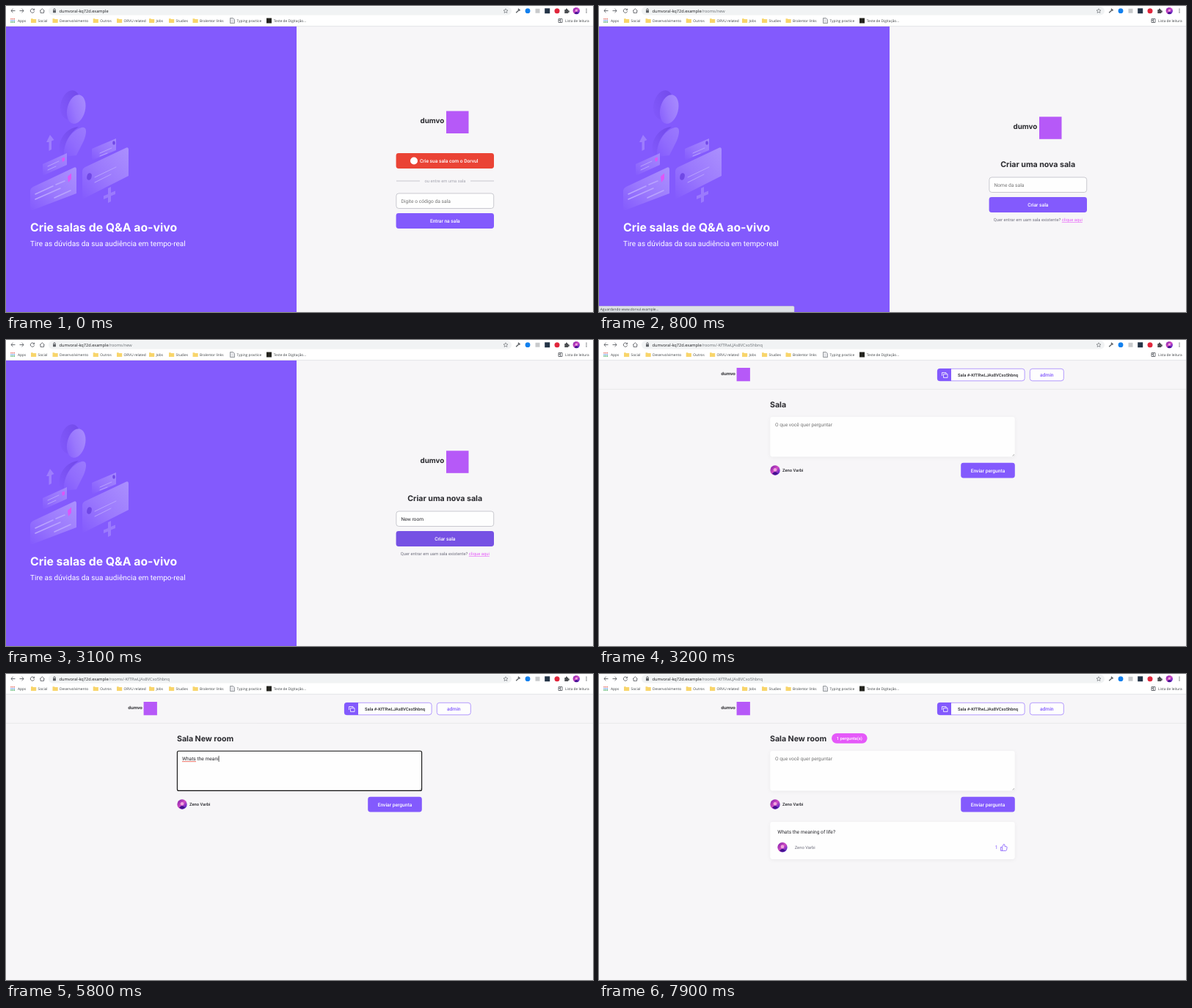
An HTML page for the animation above (8000 ms loop, 800x418 px).

```html
<!DOCTYPE html>
<html lang="pt-BR">
<head>
<meta charset="utf-8">
<title>Sala de perguntas</title>
<style>
  html, body { margin: 0; width: 100%; height: 100%; overflow: hidden; background: #f7f6f8; }
  svg { display: block; width: 100vw; height: 100vh; }
  text { font: 6.67px Roboto, sans-serif; fill: #29292e; white-space: pre; text-rendering: geometricPrecision; }
  .ui text { font: 4.8px "Open Sans", "Noto Sans", sans-serif; fill: #3c4043; }
  .ui .url { font-size: 5.65px; fill: #202124; }
  .ui .path { fill: #6b7075; }
  .ui .icon { fill: none; stroke: #5f6368; stroke-width: .9; }
  .title { font: 700 10.6px Inter, sans-serif; }
  .hero { font: 700 15.8px Inter, sans-serif; fill: #fff; }
  .lead { font-size: 10px; fill: #fff; }
  .brand { font: 700 9.8px Inter, sans-serif; }
  .mid { text-anchor: middle; }
  .bold { font-weight: 500; }
  .small { font-size: 5.83px; }
  .light { fill: #fff; }
  .grey { fill: #737380; }
  .hint { fill: #757575; }
  .field { fill: #fefefe; stroke: #a8a8b3; stroke-width: .6; }
  .panel { fill: #fefefe; filter: drop-shadow(0 1px 2.5px rgba(0,0,0,.05)); }
  .ring { fill: none; stroke: #101010; stroke-width: 1.1; }
  .caret { stroke: #000; stroke-width: .6; }
  .violet { fill: #835afd; }
  .edge { fill: #fefefe; stroke: #835afd; stroke-width: .6; }

  .on { animation: 8s step-end infinite; }
  .home { animation-name: home; }
  .create { animation-name: create; }
  .split { animation-name: split; }
  .room { animation-name: room; }
  .status { animation-name: status; }
  .ring-name { animation-name: ringName; }
  .ring-ask { animation-name: ringAsk; }
  .roomname { animation-name: roomname; }
  .posted { animation-name: posted; }
  .liked { animation-name: liked; }
  .thumb { animation-name: thumb; }
  .hover { animation: 8s linear infinite; }
  .login { animation-name: login; }
  .make { animation-name: make; }
  .send { animation-name: send; }

  @keyframes home { 0% { opacity: 1 } 4.6%, 100% { opacity: 0 } }
  @keyframes create { 0% { opacity: 0 } 4.6% { opacity: 1 } 39.6%, 100% { opacity: 0 } }
  @keyframes split { 0% { opacity: 1 } 39.6%, 100% { opacity: 0 } }
  @keyframes room { 0% { opacity: 0 } 39.6%, 100% { opacity: 1 } }
  @keyframes status { 0% { opacity: 0 } 4.6% { opacity: 1 } 10.9%, 100% { opacity: 0 } }
  @keyframes ringName { 0% { opacity: 0 } 12.2% { opacity: 1 } 35.9%, 100% { opacity: 0 } }
  @keyframes ringAsk { 0% { opacity: 0 } 47.2% { opacity: 1 } 87.2%, 100% { opacity: 0 } }
  @keyframes roomname { 0% { opacity: 0 } 40.9%, 100% { opacity: 1 } }
  @keyframes posted { 0% { opacity: 0 } 88.5%, 100% { opacity: 1 } }
  @keyframes liked { 0% { opacity: 0 } 95.9%, 100% { opacity: 1 } }
  @keyframes thumb { 0% { stroke: #737380 } 95.9%, 100% { stroke: #835afd } }
  @keyframes login { 0%, 1% { fill: #ea4335 } 3.5%, 100% { fill: #d33c30 } }
  @keyframes make { 0%, 32.2% { fill: #835afd } 34.7%, 100% { fill: #7651e4 } }
  @keyframes send { 0%, 84.7% { fill: #835afd } 87.2%, 90% { fill: #7651e4 } 92.5%, 100% { fill: #835afd } }
</style>
</head>
<body>
<svg viewBox="0 0 800 418">
  <defs>
    <linearGradient id="glow" x1="1" y1="0" x2="0" y2="1">
      <stop stop-color="#ab90fe"/><stop offset=".55" stop-color="#9a78fd"/>
      <stop offset="1" stop-color="#835afd"/>
    </linearGradient>
    <linearGradient id="shade" x1="1" y1="0" x2="0" y2="1">
      <stop stop-color="#7149e8"/><stop offset="1" stop-color="#835afd"/>
    </linearGradient>
    <linearGradient id="photo" x2="1" y2="1">
      <stop stop-color="#7a1aa8"/><stop offset=".5" stop-color="#d04cc4"/>
      <stop offset="1" stop-color="#2a14c8"/>
    </linearGradient>
    <path id="folder" d="M0 2.2h2.4l.8.9h4v5H0z" fill="#f8d56b"/>
    <g id="logo">
      <text class="brand" y="16.5">dumvo</text>
      <rect x="35.5" width="30.5" height="30.5" fill="#b659f8"/>
    </g>
    <g id="avatar">
      <circle r="6.7" fill="url(#photo)"/>
      <circle cy="-.8" r="2.3" fill="#f0a5dc"/>
      <path d="M-4 4.6q4-5 8 0q-4 3.6-8 0z" fill="#43128e"/>
    </g>
  </defs>
  <rect width="800" height="418" fill="#f7f6f8"/>

  <!-- Split layout -->
  <g class="on split">
    <rect y="28" width="396" height="390" class="violet"/>
    <ellipse cx="87.5" cy="135" rx="13" ry="20" transform="rotate(14 87.5 135)" fill="url(#shade)"/>
    <ellipse cx="95.7" cy="141" rx="12.2" ry="20.2" transform="rotate(14 95.7 141)" fill="url(#glow)"/>
    <path d="M74 205C68 184 82 166 99 165C86 174 78 188 79 205z" fill="url(#shade)"/>
    <path d="M79 206C78 186 89 170 103 166C111 164 110 174 106 184L96 204z" fill="url(#glow)" opacity=".6"/>
    <path d="M55 186L60 176L65.5 183L62 184.5V196L58.5 198V186z" fill="#9d7dfd"/>
    <path d="M139 249L143 247V255L149 252.5V257L143 259.5V267L139 269V261.5L133 264V259.5L139 257z" fill="#9b7afd"/>
    <g fill="url(#glow)">
      <path d="M50 216L83 201V217L50 232z" opacity=".85"/>
      <path d="M117 195L150 181V197L117 211z" opacity=".85"/>
      <path d="M33 253Q33 249 37 247L92 221Q96 219 96 223V256L33 280z"/>
      <path d="M104 226Q104 222 108 220L163 194Q167 192 167 196V232L104 264z"/>
    </g>
    <g stroke="#b9a3fe" stroke-width="1.6" stroke-linecap="round">
      <path d="M57 219L72 212M57 224L68 219" stroke-width="1"/>
      <path d="M40 257L64 246M68 244L80 239M40 264L74 249M66 262L88 252"/>
      <path d="M121 234L150 220M121 241L143 230M128 201L144 194M128 205L138 201" stroke-width="1"/>
    </g>
    <ellipse cx="113.5" cy="233" rx="3.2" ry="4.8" transform="rotate(14 113.5 233)" fill="#7048e6"/>
    <ellipse cx="147" cy="187" rx="1.8" ry="2.8" fill="#7048e6"/>
    <path d="M76 208L80 206.500V211L77 213z M84 233L89 228.500V236L85 241z" fill="#df55f7"/>
    <text class="hero" x="33" y="308">Crie salas de Q&amp;A ao-vivo</text>
    <text class="lead" x="33" y="328.300">Tire as dúvidas da sua audiência em tempo-real</text>
  </g>

  <!-- Landing form -->
  <g class="on home">
    <use href="#logo" x="564.500" y="143.500"/>
    <rect class="hover login" x="531.600" y="201" width="133.400" height="21" rx="3.400"/>
    <circle cx="556" cy="211.500" r="5" fill="#fff"/>
    <text class="bold light" x="564" y="213.900">Crie sua sala com o Dorvul</text>
    <path d="M532 239H564M633 239H665" stroke="#a8a8b3" stroke-width=".6"/>
    <text class="small mid" x="598.500" y="241" style="fill:#a8a8b3">ou entre em uma sala</text>
    <rect class="field" x="531.900" y="256" width="132.800" height="20.500" rx="3.400"/>
    <text class="hint" x="538.500" y="268.600">Digite o código da sala</text>
    <rect class="violet" x="531.600" y="283" width="133.400" height="21" rx="3.400"/>
    <text class="bold light mid" x="598.300" y="296">Entrar na sala</text>
  </g>

  <!-- New room form -->
  <g class="on create">
    <use href="#logo" x="564.500" y="151.300"/>
    <text class="title mid" x="598.200" y="220">Criar uma nova sala</text>
    <rect class="field" x="531.900" y="234" width="132.800" height="20.500" rx="3.400"/>
    <rect class="ring on ring-name" x="531.900" y="234" width="132.800" height="20.500" rx="3.400"/>
    <text id="name" x="538.500" y="246.600"></text>
    <path id="nameCaret" class="caret" d="M0 240.200V248.600"/>
    <rect class="hover make" x="531.600" y="261" width="133.400" height="21" rx="3.400"/>
    <text class="bold light mid" x="598.300" y="274">Criar sala</text>
    <text class="small grey mid" x="598.300" y="294">Quer entrar em uam sala existente? <tspan fill="#e559f9" text-decoration="underline">clique aqui</tspan></text>
  </g>

  <!-- Room -->
  <g class="on room">
    <path d="M0 67.300H800" stroke="#e2e2e2" stroke-width=".7"/>
    <use href="#logo" transform="translate(166.300 38) scale(.6)"/>
    <rect class="edge" x="461.300" y="39.300" width="118.800" height="16.500" rx="3.400"/>
    <path class="violet" d="M480 39V56H464.500Q461 56 461 52.500V42.500Q461 39 464.500 39z"/>
    <path d="M467.500 49V44.500H473V46M469.500 46.500H475V51.500H469.500z" fill="none" stroke="#fff" stroke-width=".8"/>
    <text class="small bold" x="489" y="49.500">Sala #-KfTRwLJAs8VCxo5hbnq</text>
    <rect class="edge" x="587.300" y="39.300" width="46" height="16.500" rx="3.400"/>
    <text class="bold mid" x="610.300" y="49.900" style="fill:#835afd">admin</text>

    <text class="title" x="233" y="91.600">Sala<tspan class="on roomname" id="suffix"></tspan></text>
    <g class="on posted">
      <rect x="317" y="81" width="48.600" height="13.700" rx="6.850" fill="#e559f9"/>
      <text class="small bold light mid" x="341.300" y="90">1 pergunta(s)</text>
    </g>
    <rect class="panel" x="233.300" y="105" width="333.400" height="54.500" rx="3.400"/>
    <path d="M563.500 158.500L566 156M565 158.500L566 157.500" stroke="#777" stroke-width=".5"/>
    <rect class="ring on ring-ask" x="233.400" y="105.200" width="333.200" height="54.200" rx="2"/>
    <text id="ask" x="240" y="118.200"></text>
    <path id="askCaret" class="caret" d="M0 111.700V120"/>
    <path id="typo" d="M240 119.600H259" stroke="#e5402f" stroke-width=".7"/>
    <use href="#avatar" x="240" y="178"/>
    <text class="small bold" x="250" y="180.200">Zeno Varbi</text>
    <rect class="hover send" x="493.200" y="167.700" width="73.600" height="20.800" rx="3.400"/>
    <text class="bold light mid" x="530" y="180.600">Enviar pergunta</text>

    <g class="on posted">
      <rect class="panel" x="233.300" y="202" width="333.400" height="51" rx="3.400"/>
      <text x="243.300" y="218">Whats the meaning of life?</text>
      <use href="#avatar" x="250" y="236.700"/>
      <text class="small grey" x="266.700" y="238.800">Zeno Varbi</text>
      <text class="on liked" x="539.700" y="239.400" style="fill:#835afd">1</text>
      <path class="on thumb" d="M549.500 236.500L551.500 232.500Q553 232.500 553 234V235.700H555.200Q556.300 235.800 556.100 237L555.500 240.500Q555.300 241.400 554.400 241.400H547.500V236.500H549.500V241.400" fill="none" stroke-width=".8" stroke-linejoin="round"/>
    </g>
  </g>

  <!-- Browser bars -->
  <g class="ui">
    <rect width="800" height="28" fill="#fff"/>
    <path d="M0 27.600H800" stroke="#d9dbdf" stroke-width=".7"/>
    <rect x="58" y="1" width="631" height="11.400" rx="5.700" fill="#f1f3f4"/>
    <g class="icon">
      <path d="M12.500 6.500H7M9.500 3.900L6.800 6.500L9.500 9.100M18.500 6.500H24M21.500 3.900L24.200 6.500L21.500 9.100"/>
      <path d="M38.200 5A2.700 2.700 0 1 0 38.600 7.300M38.700 3.600V5.600H36.600"/>
      <path d="M46 6.800L49.300 3.700L52.600 6.800M47 6.300V9.400H51.600V6.300"/>
      <path d="M64.800 6V4.800A1.200 1.200 0 0 1 67.200 4.800V6"/>
      <path d="M681 3.700L681.900 5.700L684 5.900L682.400 7.300L682.900 9.400L681 8.300L679.100 9.400L679.600 7.300L678 5.900L680.100 5.700z" stroke-width=".6"/>
      <path d="M695.200 9.200L699 5.400" stroke-width="1.400"/>
      <path d="M698 3.800L700.500 6.400" stroke-width="1.800"/>
      <path d="M753 17.500H758V22.500H753zM755.500 17.500V22.500M753 19.500H755.500"/>
      <path d="M791 3.800V9.600" stroke-width="1.300" stroke-dasharray="1.300 .9"/>
    </g>
    <rect x="64" y="5.800" width="4" height="3.400" rx=".4" fill="#5f6368"/>
    <circle cx="711" cy="6.700" r="3.400" fill="#1280ee"/>
    <rect x="721.500" y="3.700" width="6" height="6" fill="#c8cacc"/>
    <rect x="734.200" y="3.200" width="7" height="7" fill="#243447"/>
    <circle cx="751" cy="6.700" r="3.500" fill="#e0263c"/>
    <path d="M761.300 5H763A1.100 1.100 0 1 1 765 5H766.300V6.500A1.100 1.100 0 1 1 766.300 8.500V10H761.300z" fill="#4a4d51"/>
    <use href="#avatar" transform="translate(777.300 6.600) scale(.7)"/>
    <text class="url" x="72.500" y="8.700">dumvoral-kq72d.example<tspan class="path" id="path"></tspan></text>

    <g stroke-width="1.300" stroke-dasharray="1.300 .9">
      <path d="M6.300 17.600H12.500" stroke="#e2574c"/>
      <path d="M6.300 19.800H12.500" stroke="#4688f1"/>
      <path d="M6.300 22H12.500" stroke="#3aa757"/>
    </g>
    <text x="16" y="21.700">Apps</text>
    <g id="marks"></g>
    <path d="M305.500 16.500H309.500L311.500 18.500V23.500H305.500z" fill="#e4e5e8" stroke="#72767c" stroke-width=".7"/>
    <text x="314.500" y="21.700">Typing practice</text>
    <rect x="355" y="16.500" width="7" height="7" fill="#24241f"/>
    <text x="364.700" y="21.700">Teste de Digitação...</text>
    <text x="762" y="21.700">Lista de leitura</text>
    <g class="on status">
      <path d="M0 410H264.500Q266 410 266 411.500V418H0z" fill="#dee1e6" stroke="#c3c6cb" stroke-width=".5"/>
      <text x="1.800" y="416">Aguardando www.dorvul.example...</text>
    </g>
  </g>
</svg>
<script>
  const $ = id => document.getElementById(id);
  const LOOP = 8000, LEAD = 25;
  const ROOM = 'New room', QUESTION = 'Whats the meaning of life?';
  $('suffix').textContent = ' ' + ROOM;

  const folders = [['Social', 34], ['Desenvolvimento', 63.5], ['Outros', 118.7], ['ORVU related', 151],
    ['Jobs', 195], ['Studies', 222], ['Bralentor links', 254.5]];
  $('marks').innerHTML = folders.map(([label, x]) =>
    `<use href="#folder" x="${x}" y="15"/><text x="${x + 9.6}" y="21.7">${label}</text>`).join('');

  // Characters typed at time t, from a few [time, count] points.
  function typed(t, points) {
    let [t0, n0] = points[0];
    for (const [t1, n1] of points) {
      if (t < t1) return Math.floor(n0 + (n1 - n0) * Math.max(0, t - t0) / (t1 - t0 || 1) + .3);
      [t0, n0] = [t1, n1];
    }
    return n0;
  }

  const namePace = [[1430, 0], [1500, 1], [1720, 1], [2300, 8]];
  const askPace = [[4100, 0], [4300, 2], [5800, 15], [6700, 26]];

  function showField(id, text, hint, focused) {
    const el = $(id), caret = $(id + 'Caret');
    el.textContent = text || hint;
    el.setAttribute('class', text ? '' : 'hint');
    const x = +el.getAttribute('x') + (text ? el.getComputedTextLength() : 0) + .3;
    caret.setAttribute('transform', `translate(${x})`);
    caret.style.opacity = focused ? 1 : 0;
  }

  function draw() {
    const t = (performance.now() + LEAD) % LOOP;
    $('path').textContent = t < 400 ? '' : t < 3200 ? '/rooms/new' : '/rooms/-KfTRwLJAs8VCxo5hbnq';
    showField('name', ROOM.slice(0, typed(t, namePace)), 'Nome da sala', t >= 1000 && t < 2900);
    const n = t < 7100 ? typed(t, askPace) : 0;
    showField('ask', QUESTION.slice(0, n), 'O que você quer perguntar', t >= 3800 && t < 7000);
    $('typo').style.opacity = n > 5 ? 1 : 0;
    requestAnimationFrame(draw);
  }
  draw();
</script>
</body>
</html>
```
